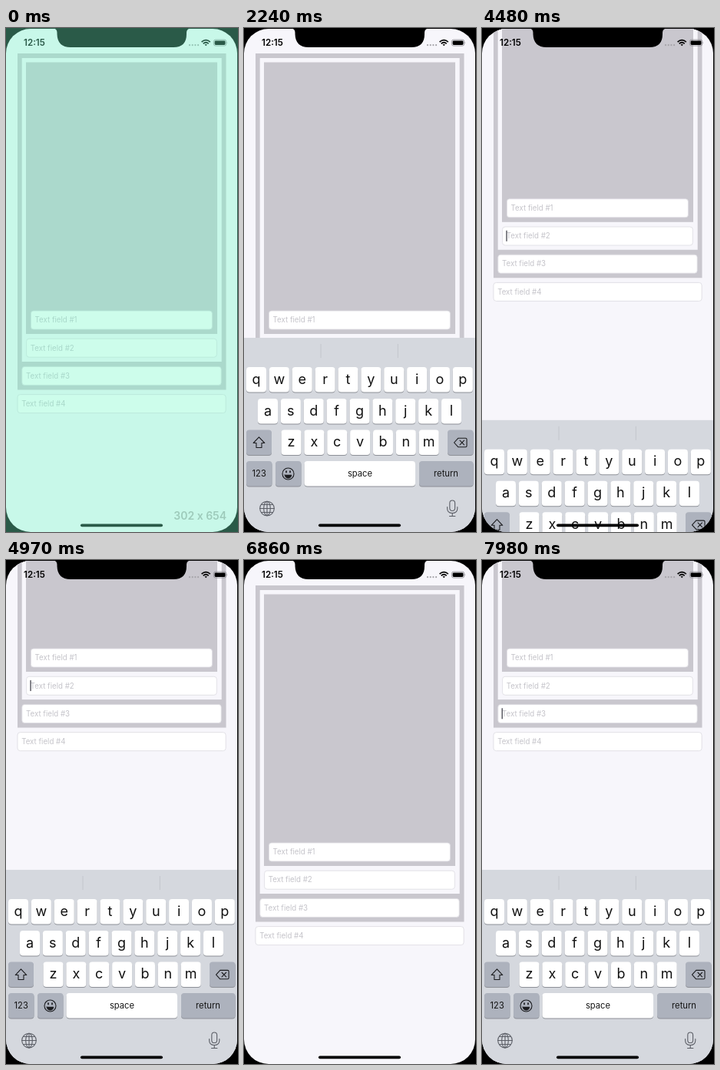
An HTML page that plays this animation: 302 px wide and 654 px high, repeating every 8000 ms.

```html
<!DOCTYPE html>
<html lang="en">
<head>
<meta charset="utf-8">
<title>Keyboard and text fields</title>
<style>
  html, body { margin: 0; width: 100%; height: 100%; overflow: hidden; background: #000; }
  svg { display: block; width: 100vw; height: 100vh; }
  text { font-family: Inter, Roboto, "Liberation Sans", sans-serif; }
  .gray { fill: #c9c7ce; }
  .light { fill: #f7f6fb; }
  .field { fill: #fff; stroke: #dcdbe1; stroke-width: .8; }
  .hint { font-size: 9.7px; fill: #c5c4ca; }
  .caret { fill: #45454f; opacity: 0; }
  .board { fill: #d5d8de; }
  .divider { fill: #c3c5cc; }
  .shade { fill: #8d9097; }
  .key { fill: #fff; }
  .special { fill: #adb2bd; }
  .letter { font-size: 18px; fill: #111; text-anchor: middle; }
  .word { font-size: 11.2px; fill: #151515; text-anchor: middle; }
  .icon { fill: none; stroke: #1b1c1f; stroke-width: 1.1; stroke-linejoin: round; stroke-linecap: round; }
  .dim { stroke: #5b5e66; }
  .clock { font-size: 11.6px; font-weight: 600; }
  .size { font-size: 14px; font-weight: 600; fill: #9ecbbb; text-anchor: end; }
</style>
</head>
<body>
<svg viewBox="0 0 302 654" xmlns="http://www.w3.org/2000/svg">
  <defs><clipPath id="screen"><rect x="0" y="1" width="301" height="653" rx="32"/></clipPath></defs>
  <rect width="302" height="654"/>
  <g clip-path="url(#screen)">
    <rect class="light" width="302" height="654"/>
    <g id="content">
      <rect class="gray" x="15" y="33" width="271.5" height="436.5"/>
      <rect class="light" x="20.7" y="39" width="260" height="394"/>
      <rect class="gray" x="26" y="44.5" width="249" height="352.5"/>
    </g>
    <g id="keyboard"><rect class="board" width="302" height="253"/></g>
  </g>

  <!-- Notch -->
  <path d="M61 0Q66.500 1 66.500 6V8Q67 25 84 25H218Q235 25 235 8V6Q235 1 241 0Z"/>

  <!-- Status bar -->
  <text class="clock" x="23" y="23.200">12:15</text>
  <g id="dots" fill="#a6a5aa"></g>
  <g fill="none" stroke="#000" stroke-width="1.700">
    <path d="M254.600 18.200Q260.200 13.200 265.800 18.200M256.700 20.300Q260.200 17.200 263.700 20.300"/>
    <path d="M260.200 23.300L258.500 21.500Q260.200 20.300 261.900 21.500Z" fill="#000" stroke="none"/>
  </g>
  <rect x="270.400" y="15.200" width="16.300" height="7.900" rx="2.300" fill="none" stroke="#8b8a90" stroke-width=".8"/>
  <rect x="271.600" y="16.400" width="13.900" height="5.500" rx="1.300"/>
  <path d="M287.500 17.700Q288.900 19.150 287.500 20.600Z" fill="#8b8a90"/>

  <rect x="97" y="643.500" width="107" height="3.700" rx="1.850"/>

  <g id="tint">
    <rect width="302" height="654" fill="rgb(118,250,200)" opacity=".36"/>
    <text class="size" x="287" y="638">302 x 654</text>
  </g>
</svg>
<script>
const LOOP = 8000, STEP = 70, BOARD = 252;
const $ = id => document.getElementById(id);
const add = (id, markup) => $(id).insertAdjacentHTML('beforeend', markup);
const rect = (cls, x, y, w, h, r = 0) =>
  `<rect class="${cls}" x="${x}" y="${y}" width="${w}" height="${h}" rx="${r}"/>`;
const label = (cls, x, y, s) => `<text class="${cls}" x="${x}" y="${y}">${s}</text>`;

// Text fields, each wider than the one above
for (let i = 0; i < 4; i++) {
  const x = 32.4 - 5.8 * i, y = 367 + 36.2 * i, w = 236 + 11.7 * i;
  add('content', rect('field', x, y, w, 24, 3.5) +
    label('hint', x + 5.2, y + 15.3, `Text field #${i + 1}`) +
    rect('caret', x + 4.8, y + 4.8, 1.3, 14));
}

for (let i = 0; i < 4; i++) add('dots', `<circle cx="${239 + 3.7 * i}" cy="22.2" r="1.1"/>`);

// Keyboard, measured from its own top edge
const key = (x, y, w, cls = 'key') =>
  rect('shade', x, y + 1, w, 32.5, 4) + rect(cls, x, y, w, 32.5, 4);
const rows = [['qwertyuiop', 3, 38], ['asdfghjkl', 18, 79], ['zxcvbnm', 48.5, 119.5]];
for (const [letters, left, y] of rows)
  [...letters].forEach((c, i) => {
    const x = left + 29.87 * i;
    add('keyboard', key(x, y, 26) + label('letter', x + 13, y + 21.5, c));
  });
add('keyboard',
  rect('divider', 99.5, 8, 1, 18) + rect('divider', 199.8, 8, 1, 18) +
  key(3, 119.5, 33, 'special') + key(265, 119.5, 33.5, 'special') +
  key(3, 160, 33.5, 'special') + key(41, 160, 33.5, 'special') +
  key(78.5, 160, 144.5) + key(228, 160, 70.5, 'special') +
  label('word', 19.7, 180.3, '123') + label('word', 151, 179.8, 'space') +
  label('word', 263, 179.8, 'return') +
  `<g class="icon">
    <path d="M19.500 128.800l7.300 7.700h-3.800v6h-7v-6h-3.800z"/>
    <path d="M273.500 136l5.200-5.700h9.800q1.500 0 1.500 1.500v8.400q0 1.500-1.500 1.500h-9.800zM281 133.200l5.600 5.600m0-5.600l-5.600 5.600"/>
    <circle cx="57.500" cy="176.500" r="7.500"/>
    <path d="M53 178h9q-.8 4.300-4.500 4.300t-4.500-4.300z" fill="#1b1c1f" stroke-width=".6"/>
    <path d="M55 173v1.400m5-1.400v1.400" stroke-width="1.700"/>
  </g>
  <g class="icon dim">
    <circle cx="30" cy="221.500" r="9.300"/><ellipse cx="30" cy="221.500" rx="4.300" ry="9.300"/>
    <path d="M30 212.200v18.600M20.700 221.500h18.600M22.500 216.500h15m-15 10h15"/>
    <rect x="267.800" y="211" width="6.800" height="13.500" rx="3.400"/>
    <path d="M264.600 219.500v2q0 6 6.600 6t6.600-6v-2M271.200 227.500v4M267.500 231.500h7.400"/>
  </g>`);

// on/off: focus gained and lost; up/down: keyboard starts to move
const sessions = [
  { on: 1260, up: 1443, off: 3010, down: 3075, lift: 0 },
  { on: 4340, up: 4374, off: 5740, down: 5908, lift: 1 },
  { on: 7350, up: 7390, off: LOOP, down: LOOP, lift: 1 }
];
const carets = document.querySelectorAll('.caret');
const clamp = v => Math.min(1, Math.max(0, v));

// Critically damped spring
const spring = ms => {
  const x = Math.max(0, ms) * 0.01826;
  return 1 - (1 + x) * Math.exp(-x);
};
const blink = ms => clamp(1 - (ms - 770) / 210) + clamp((ms - 1260) / 210);

function draw(t) {
  let shown = 0, lifted = 0;
  sessions.forEach((s, i) => {
    const level = spring(t - s.up) - spring(t - s.down);
    shown += level;
    lifted += level * s.lift;
    carets[i].style.opacity = t >= s.on && t < s.off ? blink(t - s.on) : 0;
  });
  $('keyboard').setAttribute('transform', `translate(0 ${654 - BOARD * shown})`);
  $('content').setAttribute('transform', `translate(0 ${-BOARD * lifted})`);
  $('tint').style.opacity = clamp(1 - t / 140);
}

const start = performance.now();
function tick() {
  const t = (performance.now() - start) % LOOP;
  draw(Math.floor(t / STEP) * STEP);
  requestAnimationFrame(tick);
}
draw(0);
requestAnimationFrame(tick);
</script>
</body>
</html>
```
